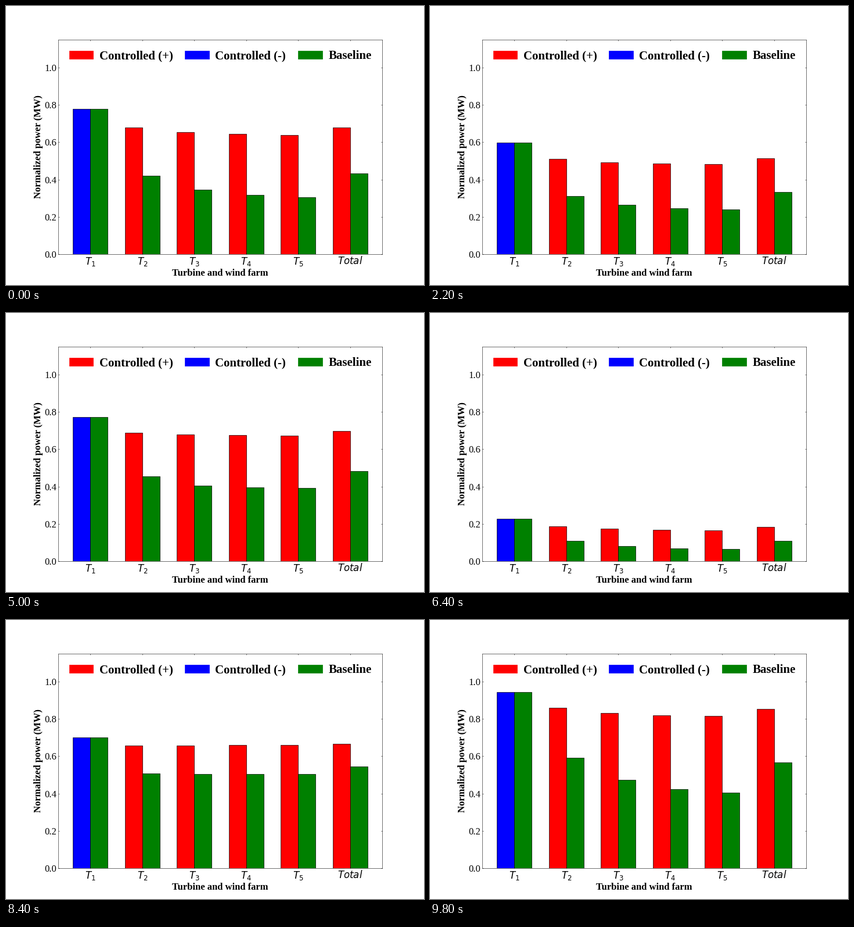
Write a matplotlib script that moves like this. It is 720x480 px and loops after 10 s.

```python
import numpy as np
import matplotlib.pyplot as plt
from matplotlib.animation import FuncAnimation
from matplotlib.patches import Patch

plt.rcParams.update({
    "font.family": "Liberation Serif",
    "font.size": 24,
    "mathtext.fontset": "dejavusans",
    "axes.labelweight": "bold",
})

STEPS, INTERVAL = 50, 200
WIDTH = 1 / 3

# turning points of the first turbine's power: step -> MW
POWER = {0: .778, 1: .800, 5: .541, 6: .420, 12: .632, 17: .713, 18: .769,
         21: .418, 25: .773, 30: .595, 32: .228, 33: .182, 36: .211,
         42: .700, 45: .421, 48: .918, 49: .943}

# baseline power of T2 and T5 as a share of T1: step -> (near, far)
WAKE = {0: (.540, .392), 5: (.460, .299), 17: (.588, .507), 30: (.588, .507),
        32: (.478, .289), 42: (.726, .721), 45: (.626, .430), 49: (.626, .430)}


def at(points, i):
    return np.interp(i, list(points), list(points.values()))


def fade(near, far, q):
    """Geometric decay from T2 to T5."""
    k = np.arange(4)
    return far + (near - far) * (q**k - q**3) / (1 - q**3)


def with_total(p, shares):
    power = p * np.append(1, shares)
    return np.append(power, power.mean())


def heights(i):
    p = at(POWER, i)
    near, far = (at({k: w[j] for k, w in WAKE.items()}, i) for j in (0, 1))
    baseline = fade(near, far, min(0.41, 3 * (near - far)))
    # control recovers most of the wake loss, more so at high power
    near_up = 1 - (0.48 - 0.11 * p**2) * (1 - near)**1.5
    far_up = 1 - (0.45 - 0.16 * p**3) * (1 - far)**1.5
    controlled = fade(near_up, far_up, 0.45)
    return with_total(p, controlled), with_total(p, baseline)


fig, ax = plt.subplots(figsize=(14.4, 9.6), dpi=50)
fig.subplots_adjust(left=0.125, right=0.9, bottom=0.11, top=0.88)

x = np.arange(6)
edge = dict(edgecolor="black", linewidth=1)
up, down = heights(0)
left = ax.bar(x - WIDTH / 2, up, WIDTH, color=["blue"] + ["red"] * 5, **edge)
right = ax.bar(x + WIDTH / 2, down, WIDTH, color="green", **edge)

ax.set_ylim(0, 1.15)
ax.set_yticks(np.arange(0, 1.1, 0.2))
ax.set_xticks(x, [f"$T_{n}$" for n in range(1, 6)] + ["$Total$"])
ax.tick_params(direction="in", top=True, right=True)
ax.set_xlabel("Turbine and wind farm")
ax.set_ylabel("Normalized power (MW)")

entries = [("red", "Controlled (+)"), ("blue", "Controlled (-)"),
           ("green", "Baseline")]
ax.legend(handles=[Patch(color=c, label=t) for c, t in entries],
          loc="upper center", ncol=3, frameon=False, handletextpad=0.5,
          columnspacing=1, prop={"size": 30, "weight": "bold"})


def update(i):
    for bars, values in zip((left, right), heights(i)):
        for bar, v in zip(bars, values):
            bar.set_height(v)
    return [*left, *right]


anim = FuncAnimation(fig, update, frames=STEPS, interval=INTERVAL,
                     repeat=True, repeat_delay=0)
plt.show()
```
